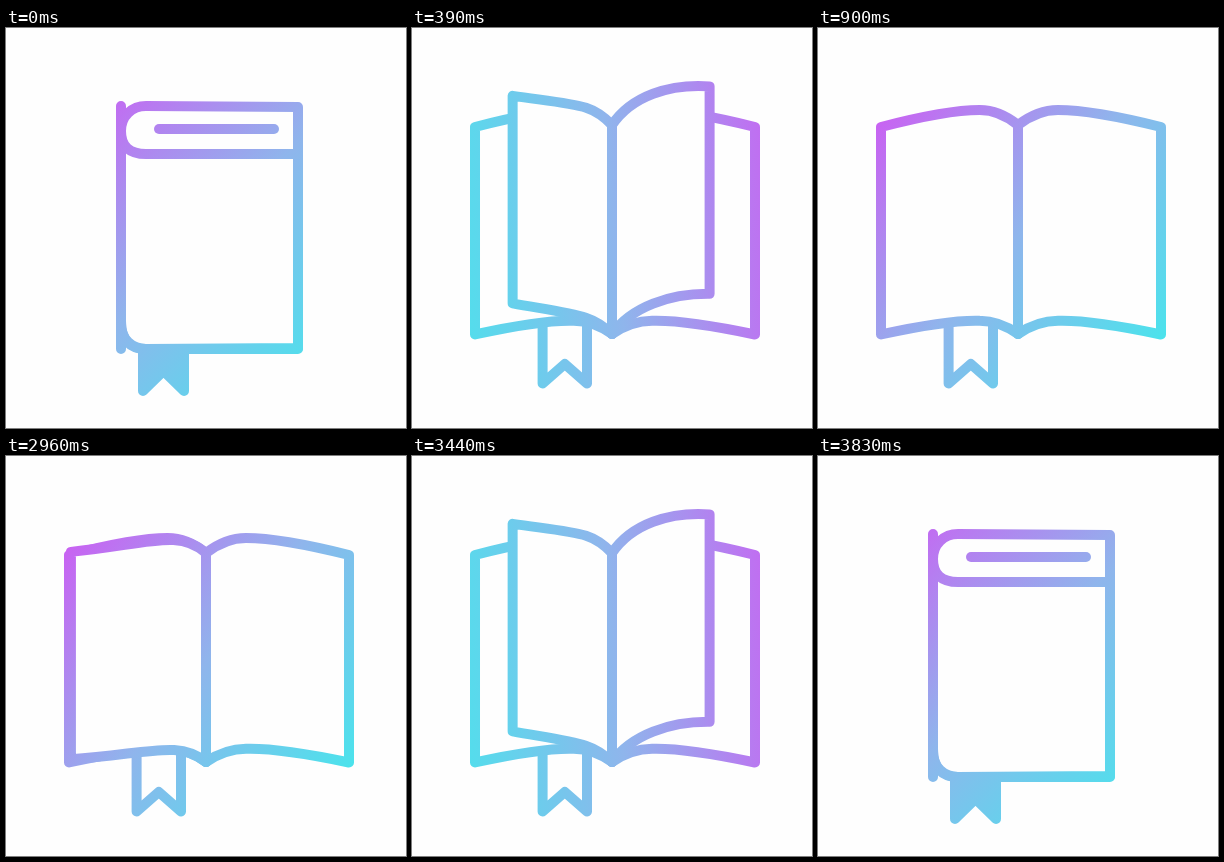
Write an HTML page that moves like this. It is 400 by 400 pixels and loops after 9860 ms.

```html
<!DOCTYPE html>
<html lang="en">
<head>
<meta charset="utf-8">
<title>Book</title>
<style>
  html, body { margin: 0; width: 100%; height: 100%; overflow: hidden; background: #fefefe; }
  svg { display: block; width: 100%; height: 100%; }
  path { fill: none; stroke: url(#ink); stroke-width: 10; stroke-linecap: round; stroke-linejoin: round; }
</style>
</head>
<body>
<svg viewBox="0 0 400 400">
  <defs>
    <linearGradient id="ink" gradientUnits="userSpaceOnUse">
      <stop offset="0" stop-color="#c863f2"/>
      <stop offset=".5" stop-color="#8fb5ec"/>
      <stop offset="1" stop-color="#4be3ec"/>
    </linearGradient>
  </defs>
</svg>
<script>
const LOOP = 9860, STEP = 30, STEPS = 30, CLOSE_AT = 2960;
const EDGE_ON = 8, SPREAD = 13;   // steps: ribbon seen edge-on, covers lying flat
const PAPER = '#fefefe';
const { PI, sin, cos, min, max, floor } = Math;

const svg = document.querySelector('svg');
const ink = document.getElementById('ink');

function addPath(fill = 'none') {
  const p = document.createElementNS('http://www.w3.org/2000/svg', 'path');
  p.style.fill = fill;
  return svg.appendChild(p);
}
const ribbon = addPath(), right = addPath(), left = addPath(), cover = addPath(), label = addPath();
const leaves = [addPath(PAPER), addPath(PAPER), addPath(PAPER)];
const spine = addPath();

const lerp = (a, b, u) => a + (b - a) * u;
const mix = (a, b, u) => a.map((v, i) => Array.isArray(v) ? mix(v, b[i], u) : lerp(v, b[i], u));
const smooth = u => u * u * (3 - 2 * u);
const show = (path, d) => path.setAttribute('d', d);

// Top edges run from the spine outwards; the lower edges follow from them
const shutTop = [[115, 103], [115, 88], [126, 78], [140, 78], [190, 78], [240, 79], [292, 79]];
const openTop = [[200, 97], [213, 87], [225, 82], [240, 82], [270, 82], [315, 92], [343, 99]];
const below = top => top.map(([x, y], i) => [x, y + 209 + 2 * sin(4 * i / (top.length - 1))]);
const shutBottom = shutTop.map(([x, y]) => [x, 399 - y]);
const openBottom = below(openTop);

function outline(top, bottom) {
  const back = [...bottom].reverse();
  return `M${top[0]}C${top.slice(1)}L${back[0]}C${back.slice(1)}`;
}

// Cover: lower edge, hinge, upper edge
const coverShut = [[292, 321], [200, 321], [140, 321], [115, 321], [115, 293], [115, 103], [115, 126], [140, 126], [292, 126]];
const coverLifted = [[160, 267], [128, 272], [117, 282], [114, 310], [106, 267], [107, 108], [112, 86], [120, 79], [160, 61]];

// Ribbon: centre, half width, top, tips, notch
const ribbonShut = [157.5, 20.5, 323, 363, 343];
const ribbonThin = [165.8, 3.8, 303, 359, 355];
const ribbonOpen = [152.8, 22.2, 297, 355.5, 336];

// A leaf turned by angle a, from 0 (flat right) to PI (flat left)
function leafOutline(a, dx) {
  const x = 203 + 140 * cos(a), span = x - 200, bend = sin(2 * a);
  const y = 99 - 62 * sin(a) ** 1.6 * (1 + 0.1 * cos(a));
  const top = [
    [200, 97],
    [200 + 0.2 * span, 72 - 4 * bend],
    [200 + span * (0.45 + 0.14 * bend), y - 15 + 26 * sin(a) - 7 * bend],
    [x, y]
  ].map(([px, py]) => [px + dx, py]);
  return outline(top, below(top));
}

function drawPages(k) {
  const u = min(1, k / SPREAD), open = 1 - (1 - u) ** 1.41;
  const top = mix(shutTop, openTop, open), bottom = mix(shutBottom, openBottom, open);
  const hinge = top[0][0], width = 0.958 * u * u, drop = 14 * sin(PI * u * u);
  const mirror = ([x, y], i) => [hinge - (x - hinge) * width, y + (i ? drop : 0)];

  show(right, outline(top, bottom));
  show(left, outline(top.map(mirror), bottom.map(mirror)));
  show(spine, `M${top[0]}L${bottom[0]}`);
  return hinge;
}

function drawCover(k) {
  const [a, b, c, d, e, f, g, h, i] = mix(coverShut, coverLifted, k / EDGE_ON);
  show(cover, k < 10 ? `M${a}Q${b} ${c}Q${d} ${e}L${f}Q${g} ${h}L${i}Z` : '');
  show(label, k < 4 ? `M${153 + 20 * k},101H${268 - 5 * k}` : '');
}

function drawLeaves(k, dx) {
  leaves.forEach((leaf, i) => {
    const p = (k - 6.9 * i) / 15.8;
    const visible = p > 0 && p < 1 && (i > 0 || k >= 10);
    // The first leaf takes over from the lifted cover
    const turn = visible ? max(p ** 1.4, i ? 0 : 0.64) : 0;
    show(leaf, visible ? leafOutline(PI * turn, dx) : '');
  });
}

function drawRibbon(k) {
  const shut = k <= EDGE_ON;
  const [x, half, y, tip, notch] = shut
    ? mix(ribbonShut, ribbonThin, k / EDGE_ON)
    : mix(ribbonThin, ribbonOpen, min(1, (k - EDGE_ON) / (SPREAD - EDGE_ON)));
  show(ribbon, `M${x - half},${y}V${tip}L${x},${notch}L${x + half},${tip}V${y}`);
  ribbon.style.fill = shut ? 'url(#ink)' : 'none';
}

function turnInk(k) {
  const a = (225 + 355 * smooth((k / STEPS) ** 1.07)) * PI / 180;
  const dx = 180 * cos(a), dy = 180 * sin(a);
  const ends = { x1: 203 + dx, y1: 203 + dy, x2: 203 - dx, y2: 203 - dy };
  for (const key in ends) ink.setAttribute(key, ends[key]);
}

function draw(k) {
  const hinge = drawPages(k);
  drawCover(k);
  drawLeaves(k, hinge - 200);
  drawRibbon(k);
  turnInk(k);
}

// Opens step by step, rests, then closes the same way back
function stepAt(t) {
  if (t < CLOSE_AT) return min(STEPS, floor(t / STEP));
  return max(0, STEPS - 1 - floor((t - CLOSE_AT) / STEP));
}

const begin = performance.now();
function tick() {
  draw(stepAt((performance.now() - begin) % LOOP));
  requestAnimationFrame(tick);
}
tick();
</script>
</body>
</html>
```
